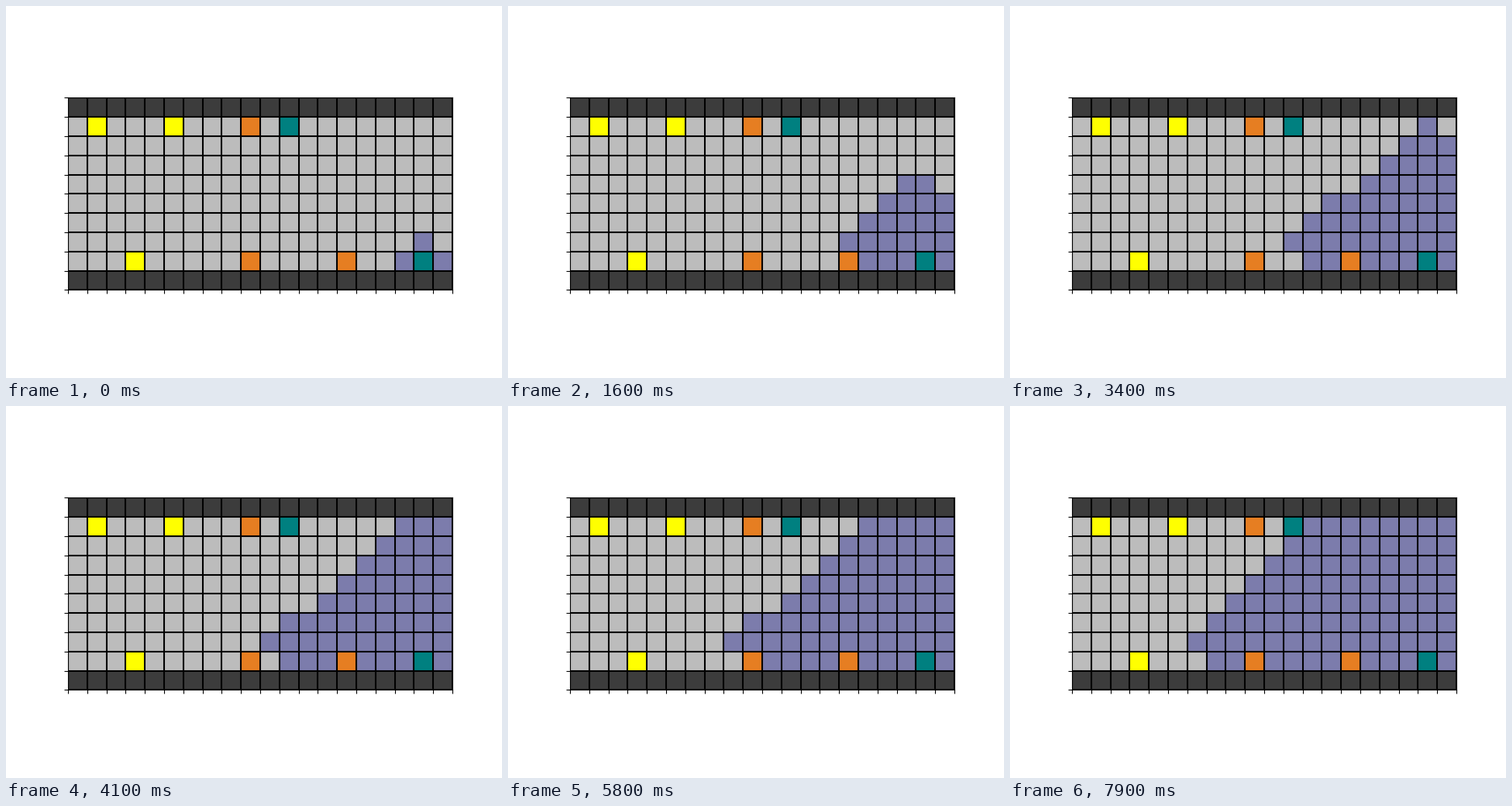
Recreate the animation shown at these times as a matplotlib script. Size 640 by 480 pixels, loop 8 s.

```python
import numpy as np
import matplotlib.pyplot as plt
from matplotlib.animation import FuncAnimation
from matplotlib.colors import ListedColormap

ROWS, COLS = 10, 20
FRAMES, INTERVAL = 80, 100

FLOOR, WALL, SEEN, YELLOW, ORANGE, TEAL = range(6)
PALETTE = ["#bcbcbc", "#3c3c3c", "#7c7cac", "#ffff00", "#e67e22", "#008080"]

START, GOAL = (8, 18), (1, 11)
STEPS = [(0, -1), (0, 1), (1, 0), (-1, 0)]  # left, right, down, up


def make_room():
    room = np.full((ROWS, COLS), FLOOR)
    room[[0, -1]] = WALL
    for cell in [(1, 1), (1, 5), (8, 3)]:
        room[cell] = YELLOW
    for cell in [(1, 9), (8, 9), (8, 14)]:
        room[cell] = ORANGE
    room[START] = room[GOAL] = TEAL
    return room


def search(room, count):
    """Breadth-first flood: one room state per cell taken off the queue."""
    room = room.copy()
    queue, seen, states = [START], set(), []
    for i in range(count):
        row, col = queue[i]
        for dr, dc in STEPS:
            cell = row + dr, col + dc
            if cell in seen or not 0 <= cell[1] < COLS:
                continue
            if room[cell] in (FLOOR, TEAL):
                # the start is not marked at first, so it gets queued again
                seen.add(cell)
                queue.append(cell)
                if room[cell] == FLOOR:
                    room[cell] = SEEN
        states.append(room.copy())
    return states


states = search(make_room(), FRAMES)

fig, ax = plt.subplots(figsize=(6.4, 4.8), dpi=100)
fig.subplots_adjust(left=0.125, right=0.9, bottom=0.11, top=0.88)
image = ax.imshow(states[0], cmap=ListedColormap(PALETTE),
                  vmin=-0.5, vmax=len(PALETTE) - 0.5, interpolation="nearest")
ax.set_xticks(np.arange(COLS + 1) - 0.5, labels=[])
ax.set_yticks(np.arange(ROWS + 1) - 0.5, labels=[])
ax.grid(color="black", linestyle="-", linewidth=1.5)


def update(frame):
    image.set_data(states[frame])
    return [image]


anim = FuncAnimation(fig, update, frames=FRAMES, interval=INTERVAL,
                     repeat=True, repeat_delay=0)
plt.show()
```
